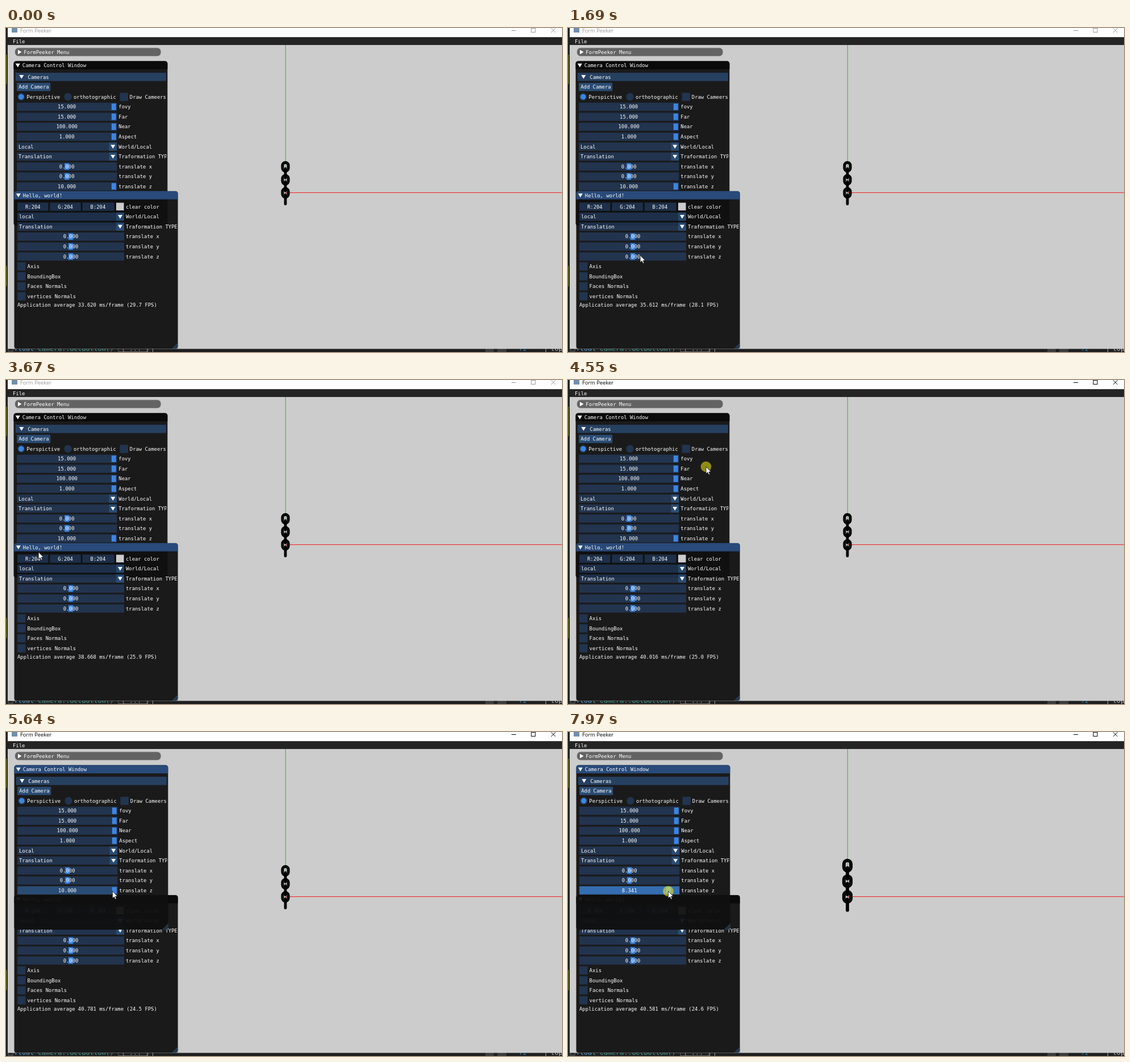
Animation of 979 by 572 pixels, one loop 8000 ms. Source, as an HTML page with a canvas:

```html
<!DOCTYPE html>
<html lang="en">
<head>
<meta charset="utf-8">
<title>Form Peeker</title>
<style>
html, body { margin: 0; width: 100%; height: 100%; overflow: hidden; background: #1e1e1e; }
canvas { display: block; }
</style>
</head>
<body>
<canvas id="stage" width="979" height="572"></canvas>
<script>
const ctx = document.getElementById('stage').getContext('2d');
const LOOP = 8000, ROW = 17.57, PIXEL = 0.764;
const UI_FONT = '8.88px "DejaVu Sans Mono", monospace';
const CODE_FONT = '11.7px "DejaVu Sans Mono", monospace';
const FRAME = 'rgba(41,74,122,.54)', HOVER = 'rgba(66,150,250,.4)',
      PRESSED = 'rgba(66,150,250,.67)', HEADER = 'rgba(66,150,250,.31)',
      GRAB = '#3d85e0', TITLE = '#294a7a';

// Time marks of the interaction
const APP_FOCUS = 4500, CLICK = [4490, 4610], CAMERA_FOCUS = 4590, DRAG = 6200, ENTER = 420;

const pointerKeys = [
  [420, 874, 555], [460, 655, 485], [500, 495, 437], [540, 387, 403], [580, 310, 380],
  [640, 258, 358], [720, 238, 347], [870, 234, 345], [1040, 205, 366], [1300, 165, 381],
  [1660, 129, 401], [1900, 114, 404], [2300, 112, 405], [3340, 112, 405], [3600, 62, 330],
  [3760, 51, 270], [3950, 115, 195], [4140, 218, 166], [4420, 243, 153], [4650, 243, 153],
  [5030, 226, 237], [5350, 196, 274], [5640, 187.5, 281], [6200, 186.5, 281],
  [7010, 186.5, 281], [7480, 183.7, 281], [7970, 176.5, 281]
];
const frameTimeKeys = [
  [0, 33.62], [1040, 34.598], [2460, 36.814], [4550, 40.016], [5640, 40.781],
  [7010, 40.858], [7970, 40.581]
];

function sample(keys, t) {
  const next = keys.findIndex(k => k[0] > t);
  if (next === 0) return keys[0].slice(1);
  if (next < 0) return keys[keys.length - 1].slice(1);
  const a = keys[next - 1], b = keys[next], p = (t - a[0]) / (b[0] - a[0]);
  return a.slice(1).map((v, i) => v + (b[i + 1] - v) * p);
}

function box(x, y, w, h, color) {
  ctx.fillStyle = color;
  ctx.fillRect(x, y, w, h);
}

function shape(points, color, outline) {
  ctx.beginPath();
  points.forEach(([x, y]) => ctx.lineTo(x, y));
  ctx.closePath();
  ctx.fillStyle = color;
  ctx.fill();
  if (outline) { ctx.strokeStyle = outline; ctx.lineWidth = 0.8; ctx.stroke(); }
}

function disc(x, y, r, color) {
  ctx.beginPath();
  ctx.arc(x, y, r, 0, Math.PI * 2);
  ctx.fillStyle = color;
  ctx.fill();
}

function line(color, width, ...points) {
  ctx.beginPath();
  points.forEach(([x, y], i) => i ? ctx.lineTo(x, y) : ctx.moveTo(x, y));
  ctx.strokeStyle = color;
  ctx.lineWidth = width;
  ctx.stroke();
}

function text(str, x, y, align = 'left') {
  ctx.font = UI_FONT;
  ctx.textAlign = align;
  ctx.fillStyle = '#fff';
  ctx.fillText(str, x, y + 3.2);
}

function downArrow(x, y) {
  shape([[x - 4, y - 3], [x + 4, y - 3], [x, y + 3.7]], '#fff');
}

const field = (x, y, w, color = FRAME) => box(x, y - 7.2, w, 14.5, color);

function slider(x, y, w, value, fraction, label, fill, grab = GRAB) {
  field(x, y, w, fill);
  box(x + 1.5 + fraction * (w - 11), y - 5.7, 8, 11.5, grab);
  text(value.toFixed(3), x + w / 2, y, 'center');
  text(label, x + w + 3, y);
}

function combo(x, y, w, value, label) {
  field(x, y, w - 14);
  field(x + w - 14, y, 14, HOVER);
  downArrow(x + w - 7, y);
  text(value, x + 3, y);
  text(label, x + w + 3, y);
}

function panel(x, y, w, h, title, active, content) {
  ctx.save();
  ctx.beginPath();
  ctx.roundRect(x, y, w, h, 5);
  ctx.save();
  ctx.clip();
  box(x, y, w, h, 'rgba(15,15,15,.94)');
  box(x, y, w, 14.7, active ? TITLE : '#0a0a0a');
  shape([[x + w, y + h - 11], [x + w, y + h], [x + w - 11, y + h]], 'rgba(66,150,250,.25)');
  ctx.restore();
  ctx.strokeStyle = 'rgba(80,80,95,.5)';
  ctx.lineWidth = 0.8;
  ctx.stroke();
  downArrow(x + 7.5, y + 7.4);
  text(title, x + 15.5, y + 7.6);
  ctx.beginPath();
  ctx.rect(x, y, w - 2, h);
  ctx.clip();
  content(x);
  ctx.restore();
}

function cameraPanel(active, z, zFill, zGrab) {
  panel(active ? 14.3 : 13.3, 58.3, 271.3, 291, 'Camera Control Window', active, left => {
    const x = left + 5.7, w = 176.3;
    box(left + 3.5, 79, 265, 14.6, HEADER);
    downArrow(left + 14, 86);
    text('Cameras', left + 25, 86.6);
    field(x, 104, 59.3, HOVER);
    text('Add Camera', x + 3.2, 104.2);
    disc(x + 7.7, 121.5, 6.7, FRAME);
    disc(x + 7.7, 121.5, 4.8, GRAB);
    text('Perspictive', x + 17.3, 121.7);
    disc(x + 90, 121.5, 6.7, FRAME);
    text('orthotographic', x + 100, 121.7);
    field(x + 181.5, 121.5, 14.5);
    text('Draw Cameers', x + 198.8, 121.7);
    [['fovy', 15], ['Far', 15], ['Near', 100], ['Aspect', 1]].forEach(([label, value], i) =>
      slider(x, 139.1 + i * ROW, w, value, 1, label));
    combo(x, 209.3, w, 'Local', 'World/Local');
    combo(x, 226.9, w, 'Translation', 'Traformation TYPE');
    slider(x, 244.5, w, 0, 0.5, 'translate x');
    slider(x, 262, w, 0, 0.5, 'translate y');
    slider(x, 279.5, w, z, (z + 10) / 20, 'translate z', zFill, zGrab);
  });
}

function helloPanel(active, frameTime) {
  panel(14.3, 287.8, 288.5, 279, 'Hello, world!', active, left => {
    const x = left + 5.7, w = 188;
    ['R', 'G', 'B'].forEach((channel, i) => {
      field(x + i * 57.3, 315.4, i < 2 ? 54.5 : 56);
      text(channel + ':204', x + 27.3 + i * 57.3, 315.6, 'center');
    });
    box(x + 174, 308.5, 13.5, 13.5, '#ccc');
    text('clear color', x + 191, 315.6);
    combo(x, 333, w, 'local', 'World/Local');
    combo(x, 350.5, w, 'Translation', 'Traformation TYPE');
    ['x', 'y', 'z'].forEach((axis, i) => slider(x, 368.2 + i * ROW, w, 0, 0.5, 'translate ' + axis));
    ['Axis', 'BoundingBox', 'Faces Normals', 'vertices Normals'].forEach((label, i) => {
      field(x, 420.8 + i * ROW, 14.5);
      text(label, x + 17.6, 421 + i * ROW);
    });
    text(`Application average ${frameTime.toFixed(3)} ms/frame (${(1000 / frameTime).toFixed(1)} FPS)`, x, 489.2);
  });
}

function editorBackdrop() {
  box(0, 0, 979, 572, '#1e1e1e');
  box(0, 47, 1.2, 52, '#77771c');
  box(0, 420, 1.2, 36, '#77771c');
  ctx.font = CODE_FONT;
  ctx.textAlign = 'left';
  [['float', 14, '#569cd6'], ['Camera::GetBottom()', 56, '#3f9d94'], ['{ ... }', 203, '#8a8a8a'],
   ['72', 903, '#2b80ad'], ['top', 959, '#b8b8b8']].forEach(([str, x, color]) => {
    ctx.fillStyle = color;
    ctx.fillText(str, x, 569.7);
  });
  ctx.strokeStyle = '#777';
  ctx.lineWidth = 0.8;
  ctx.strokeRect(4, 562, 8, 8.5);
  ctx.strokeRect(198, 556, 52, 15.5);
  box(258, 564, 1, 8, '#999');
  box(844, 565, 15, 7, '#3c3c3f');
  box(865, 565, 16, 7, '#3c3c3f');
  box(950, 564, 1, 8, '#aaa');
}

function appWindow(focused) {
  const ink = focused ? '#000' : '#999';
  box(3, 0, 976, 16.5, '#fff');
  box(10, 0, 10, 8, '#6f8fae');
  ctx.font = '9.3px "Open Sans", sans-serif';
  ctx.textAlign = 'left';
  ctx.fillStyle = ink;
  ctx.fillText('Form Peeker', 25, 8);
  line(ink, 1, [890, 4.5], [898, 4.5]);
  ctx.strokeRect(925, 0.5, 7, 7);
  line(ink, 1, [960, 0.5], [967.5, 8]);
  line(ink, 1, [967.5, 0.5], [960, 8]);
  box(3, 16.3, 976, 14, '#242424');
  text('File', 12, 23.6);
  box(3, 30, 976, 536.5, '#ccc');
}

function chain(z) {
  ctx.save();
  ctx.translate(492, 291);
  ctx.scale(10 / z, 10 / z);
  for (const y of [-46, -23, 0]) {
    ctx.beginPath();
    ctx.roundRect(-5.1, y - 7.5, 10.2, 15, 5);
    ctx.strokeStyle = '#000';
    ctx.lineWidth = 5;
    ctx.stroke();
    ctx.setLineDash([0.6, 1.8]);
    ctx.strokeStyle = '#777';
    ctx.lineWidth = 0.8;
    ctx.stroke();
    ctx.setLineDash([]);
  }
  for (const y of [-34.5, -11.5, 11.5]) {
    ctx.beginPath();
    ctx.roundRect(-2.4, y - 10.5, 4.8, 21, 2.2);
    ctx.fillStyle = '#000';
    ctx.fill();
  }
  ctx.restore();
}

function scene(z) {
  line('#0fcb1c', 1, [492.3, 30], [492.3, 291]);
  line('#f01818', 1, [492, 290.7], [979, 290.7]);
  chain(z);
  ctx.beginPath();
  ctx.roundRect(16, 35.2, 256.5, 14.4, 6);
  ctx.fillStyle = '#636363';
  ctx.fill();
  ctx.strokeStyle = '#8585888c';
  ctx.lineWidth = 0.8;
  ctx.stroke();
  shape([[21, 38.5], [27.5, 42.5], [21, 46.5]], '#fff');
  text('FormPeeker Menu', 31.3, 43);
}

function pointer(x, y, pressed) {
  if (pressed) disc(x, y, 9.3, 'rgba(255,245,10,.52)');
  const arrow = [[0, 0], [0, 12.5], [2.9, 9.9], [4.9, 14.3], [6.9, 13.4], [5, 9.3], [8.8, 9]];
  shape(arrow.map(([dx, dy]) => [x + dx, y + dy]), '#fff', '#111');
}

function draw(t) {
  const [x, y] = sample(pointerKeys, t);
  const [frameTime] = sample(frameTimeKeys, t);
  const dragging = t >= DRAG, cameraActive = t >= CAMERA_FOCUS;
  const z = dragging ? 9.539 - Math.round((186.5 - x) / PIXEL) * 0.09215 : 10;
  const hovered = cameraActive && x > 20 && x < 196 && y > 272 && y < 287;
  const zFill = dragging ? PRESSED : hovered ? HOVER : FRAME;
  const camera = () => cameraPanel(cameraActive, z, zFill, dragging ? '#4296fa' : GRAB);
  const hello = () => helloPanel(!cameraActive, frameTime);

  editorBackdrop();
  appWindow(t >= APP_FOCUS);
  scene(z);
  ctx.save();
  ctx.beginPath();
  ctx.rect(3, 30, 976, 536.5);
  ctx.clip();
  (cameraActive ? [hello, camera] : [camera, hello]).forEach(paint => paint());
  ctx.restore();
  if (t >= ENTER) pointer(x, y, dragging || (t >= CLICK[0] && t < CLICK[1]));
}

const start = performance.now();
function tick() {
  const t = (performance.now() - start) % LOOP;
  draw(Math.floor(t / 10) * 10);
  requestAnimationFrame(tick);
}
tick();
</script>
</body>
</html>
```
